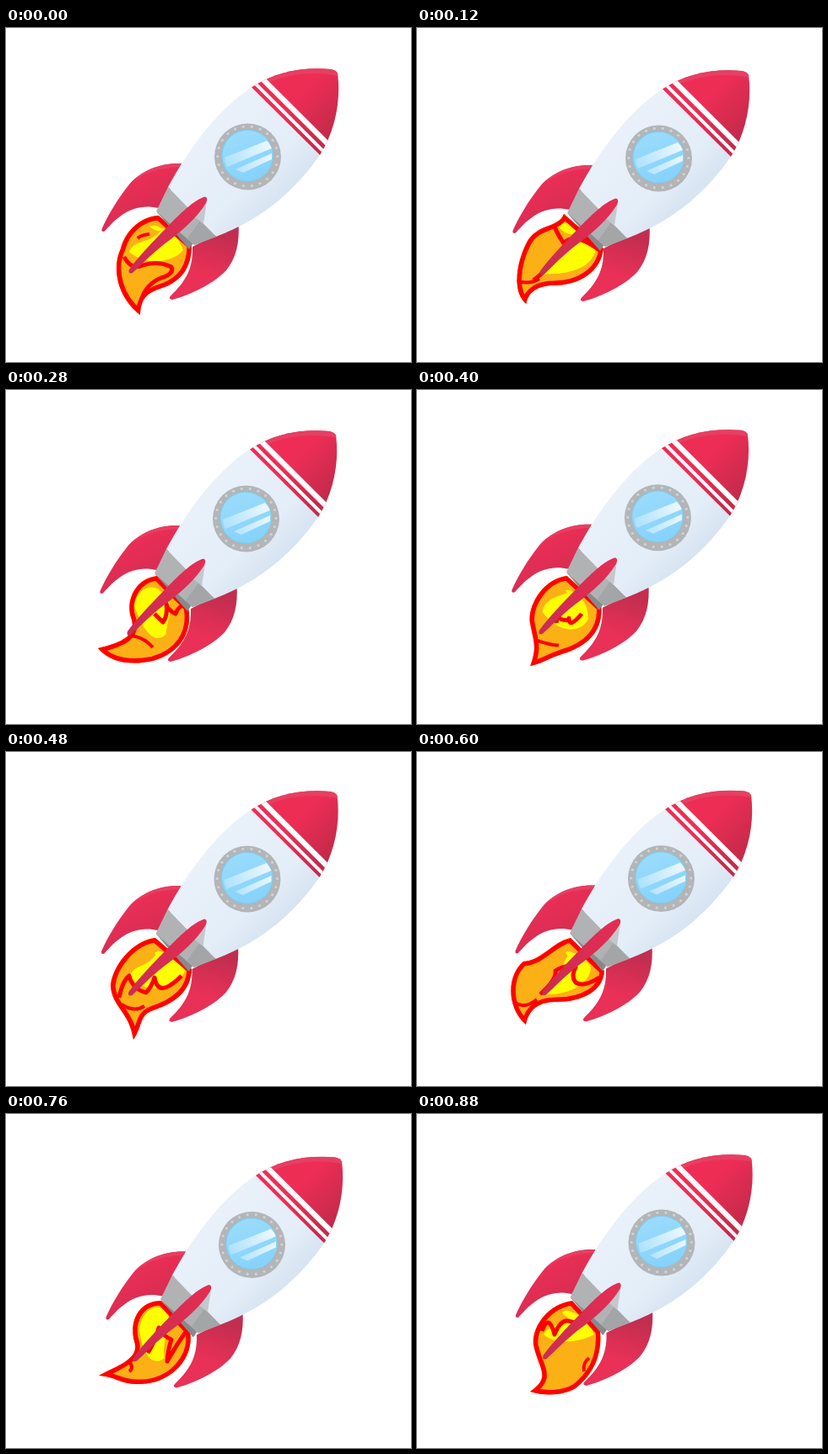
These frames come from a looping animation (480x397 px, 920 ms). An HTML page:

```html
<!DOCTYPE html>
<html lang="en">
<head>
<meta charset="utf-8">
<title>Rocket</title>
<style>
  html, body { margin: 0; width: 100%; height: 100%; overflow: hidden; background: #fff; }
  svg { display: block; width: 480px; height: 397px; }
</style>
</head>
<body>
<svg viewBox="0 0 480 397">
  <defs>
    <linearGradient id="hull" gradientUnits="userSpaceOnUse" x1="230" y1="110" x2="325" y2="205">
      <stop offset="0" stop-color="#eaf1fa"/><stop offset=".7" stop-color="#e4eef8"/><stop offset="1" stop-color="#d6e3f1"/>
    </linearGradient>
    <linearGradient id="glass" gradientUnits="userSpaceOnUse" x1="275" y1="120" x2="297" y2="182">
      <stop offset="0" stop-color="#9bdcfc"/><stop offset="1" stop-color="#84d2fb"/>
    </linearGradient>
    <linearGradient id="glare" gradientUnits="userSpaceOnUse" x1="259" y1="162" x2="316" y2="142">
      <stop offset="0" stop-color="#fff" stop-opacity=".25"/><stop offset="1" stop-color="#fff" stop-opacity=".85"/>
    </linearGradient>
    <linearGradient id="cap" gradientUnits="userSpaceOnUse" x1="350" y1="75" x2="392" y2="117">
      <stop offset="0" stop-color="#ee2d55"/><stop offset="1" stop-color="#c42a4b"/>
    </linearGradient>
    <linearGradient id="wing" gradientUnits="userSpaceOnUse" x1="155" y1="175" x2="175" y2="215">
      <stop offset="0" stop-color="#ec2e56"/><stop offset="1" stop-color="#d92d52"/>
    </linearGradient>
    <linearGradient id="fin" gradientUnits="userSpaceOnUse" x1="254" y1="245" x2="240" y2="292">
      <stop offset="0" stop-color="#c22e4f"/><stop offset="1" stop-color="#e93056"/>
    </linearGradient>
    <linearGradient id="spine" gradientUnits="userSpaceOnUse" x1="236" y1="202" x2="148" y2="290">
      <stop offset="0" stop-color="#e42e54"/><stop offset="1" stop-color="#cb2c50"/>
    </linearGradient>
    <clipPath id="nose"><path d="M291 70.5C318 53 350 46 385 49Q391 50 393 54C397 84 391 121 372 151Z"/></clipPath>
    <clipPath id="edge"><path id="outer"/></clipPath>
  </defs>

  <g clip-path="url(#edge)" fill="none" stroke="#f00" stroke-linejoin="round">
    <path fill="#fbb016" stroke="none" d="M90 200H240V350H90Z"/>
    <path id="core" fill="#ff0" stroke="none"/>
    <path id="tongue" stroke-width="5"/>
    <path id="lick" stroke-width="4"/>
    <use href="#outer" stroke-width="11"/>
  </g>

  <g id="rocket">
    <path fill="url(#wing)" d="M208 161C182 160 160 170 146 186C133 202 121 222 113.5 239Q113 243 117 241.5C132 224 151 207 181 214L200 185Z"/>
    <path fill="#e63f63" d="M208 161C182 160 160 170 146 186C164 171 180 167 205 165Z"/>
    <path fill="url(#fin)" d="M275.5 232C277 255 273 273 261 288C246 304 219 317 197 323Q192 322 195 318.5C211 303 222 288 221 260L250 245Z"/>
    <path fill="#87898c" d="M179 219L186 215L223 254L217 263Z"/>
    <path fill="url(#hull)" d="M192 189C212 152 246 100 291 70.5L372 151C345 189 309 225 249 248Z"/>
    <path fill="#b1b2b4" d="M192 189L249 248L223 258L178 218Z"/>
    <path fill="#a3a5a7" d="M249 248L223 258L215 250L230 229Z"/>
    <path fill="#c4c8cc" d="M238 206L234 233L221 222Z"/>
    <g clip-path="url(#nose)">
      <path fill="url(#cap)" d="M280 40H400V160H280Z"/>
      <path fill="#e63f63" d="M308 66C335 54 365 51 395 57V40H300Z"/>
      <path stroke="#fff" stroke-width="6.3" d="M296 52.5L391 147.5"/>
      <path stroke="#fff" stroke-width="4" d="M289 59.5L385 155.5"/>
    </g>
    <circle cx="286.5" cy="153" r="39.5" fill="#b3b5b7"/>
    <circle cx="286" cy="151.5" r="31" fill="#85c6e6"/>
    <circle cx="286.3" cy="151.8" r="30" fill="url(#glass)"/>
    <g id="rivets" fill="#d0d2d4"/>
    <path fill="url(#glare)" d="M259 154L309 134Q313 138 315 143L262 165Q259 160 259 154ZM272 168L315 149V156L281 172Z"/>
    <path fill="url(#spine)" d="M236 200.5Q240 202 237 208C226 226 208 242 188 256.5C172 269 158 284 150 291Q144 293 146 287C156 273 173 255 190.5 237C206 221 223 204 236 200.5Z"/>
  </g>
</svg>
<script>
const LOOP = 920, STEP = 40;
const $ = id => document.getElementById(id);

// Each pose: time, rocket offset, then the flame's paths.
const poses = [
  { t: 0, at: '0 0',
    outer: 'M181 223C160 224 142 240 136 262C124 288 134 322 159 341C160 318 170 314 188 308C208 300 220 285 220 258Z',
    core: 'M146 266C152 250 172 258 186 238C196 240 206 252 210 264C200 278 166 284 146 266ZM170 236Q178 232 186 240Q180 244 170 236Z',
    tongue: 'M140 272Q148 288 162 282Q180 276 196 284Q200 292 184 297Q166 304 160 324',
    lick: 'M156 250Q160 246 170 245' },
  { t: 120, at: '0 2',
    outer: 'M174 221C168 238 142 232 130 255C118 278 112 314 129.5 328C132 312 146 306 162 306C192 306 218 290 221 262Z',
    core: 'M146 292C168 276 170 262 180 254C190 248 204 254 212 262C208 288 174 294 146 292ZM168 236Q176 226 196 240Q180 252 168 236Z',
    tongue: 'M162 234Q168 248 174 256Q186 242 216 264Q196 244 176 256Q166 278 138 300',
    lick: 'M118 300Q132 306 145 298' },
  { t: 280, at: '-2 0',
    outer: 'M179 221C152 224 142 252 148 270C156 292 138 300 109 307C125 326 152 327 174 322C204 314 222 290 216 258Z',
    core: 'M152 256C156 234 176 228 186 242C204 262 190 268 190 290C176 304 162 286 152 256ZM176 238Q184 236 190 246Q180 248 176 238Z',
    tongue: 'M213 254Q203 258 201 266Q192 262 190 254Q192 268 186 276Q180 270 176 266',
    lick: 'M144 292Q162 292 174 306' },
  { t: 480, at: '-.5 -2',
    outer: 'M177 221C150 224 126 254 124 278C126 304 146 308 151 342C162 326 158 314 172 308C202 298 219 284 220 258Z',
    core: 'M146 268C152 250 170 258 180 236C200 242 210 254 212 260C204 284 166 288 146 268ZM176 238Q184 236 190 246Q180 248 176 238Z',
    tongue: 'M134 292Q138 272 146 266Q150 282 166 286Q172 280 176 268Q180 294 208 266',
    lick: 'M137 300Q152 310 164 302' },
  { t: 600, at: '3 -2.5',
    outer: 'M182 221C160 226 148 248 126 249C106 266 106 304 129 324C134 302 148 297 166 297C196 297 221 284 222 260Z',
    core: 'M152 288C168 278 166 262 180 240C190 236 200 246 206 256C206 276 176 290 152 288ZM176 238Q184 234 190 246Q180 248 176 238Z',
    tongue: 'M146 288Q166 270 164 260Q176 252 188 256Q182 266 188 274Q198 280 216 268',
    lick: 'M116 298Q128 306 142 294' },
  { t: 760, at: '5 2.5',
    outer: 'M184 222C156 222 146 248 152 270C160 292 128 300 110 311C130 312 136 322 160 321C196 320 224 290 218 258Z',
    core: 'M158 256C162 230 182 222 192 238C196 256 184 270 188 290C176 300 162 290 158 256ZM176 238Q184 234 190 246Q180 248 176 238Z',
    tongue: 'M168 284Q178 268 181 254Q186 264 196 268Q192 280 191 294Q202 274 215 256',
    lick: 'M146 294Q152 302 146 306' },
  { t: 880, at: '3.5 0',
    outer: 'M184 222C154 226 136 254 138 274C144 304 160 312 134 330C154 336 174 334 188 326C206 312 220 290 217 258Z',
    core: 'M150 262C156 250 174 252 184 236C198 238 204 250 210 262C196 270 166 276 150 262ZM172 236Q180 230 188 240Q180 246 172 236Z',
    tongue: 'M148 258Q156 236 163 262Q170 244 180 246Q190 250 200 246Q208 246 214 254',
    lick: 'M198 306Q196 296 204 290' }
];
poses.push({ ...poses[0], t: LOOP });

const NUM = /-?\d*\.?\d+/g;
function blend(a, b, k) {
  const to = b.match(NUM);
  let i = 0;
  return a.replace(NUM, n => (+n + (to[i++] - n) * k).toFixed(2));
}

function draw(t) {
  const i = poses.findIndex(p => p.t > t);
  const a = poses[i - 1], b = poses[i], k = (t - a.t) / (b.t - a.t);
  $('rocket').setAttribute('transform', `translate(${blend(a.at, b.at, k)})`);
  for (const id of ['outer', 'core', 'tongue', 'lick'])
    $(id).setAttribute('d', blend(a[id], b[id], k));
}

const RIVETS = 22;
for (let i = 0; i < RIVETS; i++) {
  const dot = document.createElementNS('http://www.w3.org/2000/svg', 'circle');
  const angle = i / RIVETS * 2 * Math.PI;
  dot.setAttribute('cx', 286.3 + 35.5 * Math.cos(angle));
  dot.setAttribute('cy', 152.5 + 35.5 * Math.sin(angle));
  dot.setAttribute('r', 1.6);
  $('rivets').append(dot);
}

function tick() {
  draw(Math.floor(performance.now() % LOOP / STEP) * STEP);
  requestAnimationFrame(tick);
}
tick();
</script>
</body>
</html>
```
